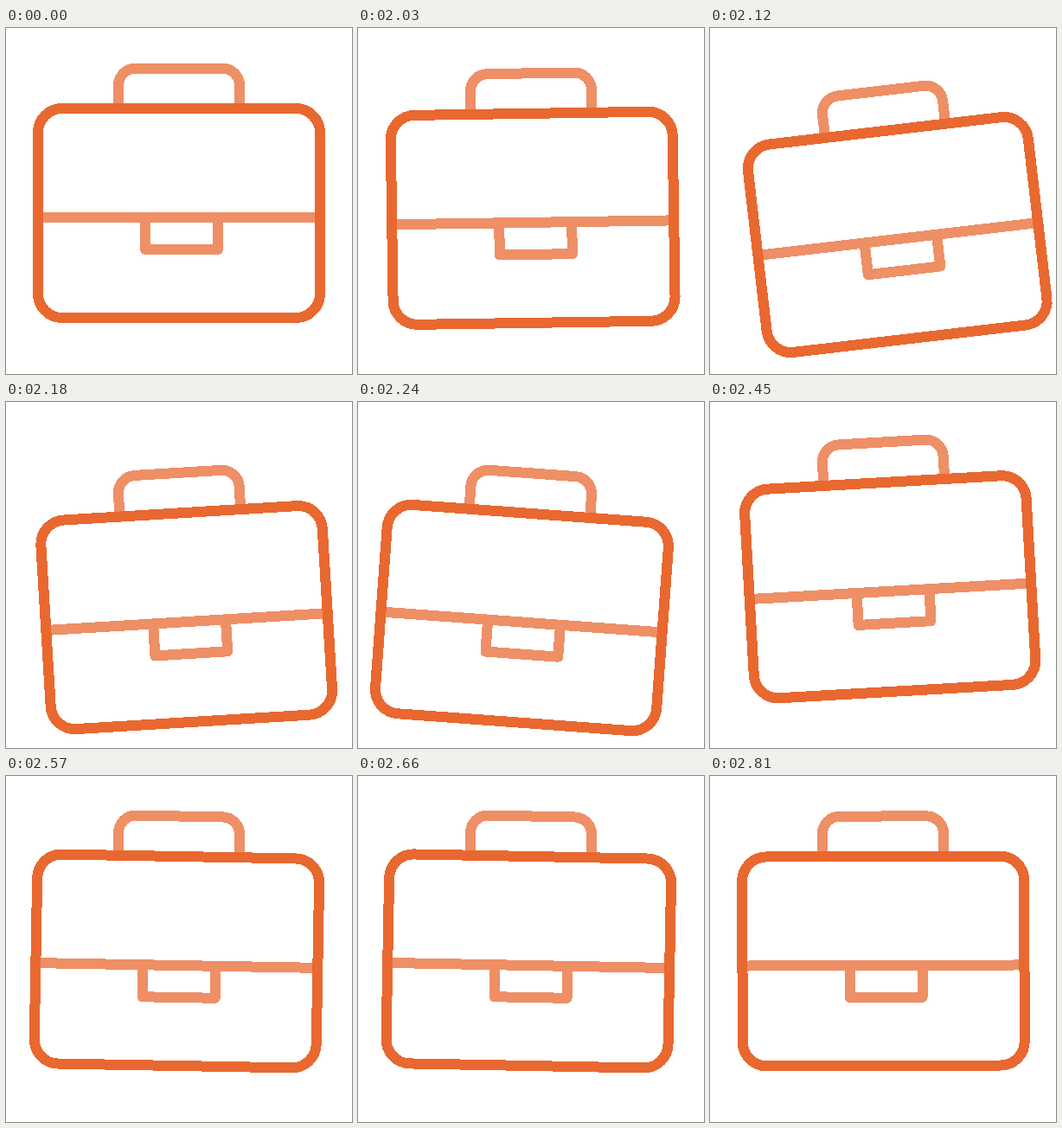
These frames come from a looping animation (400 by 400 pixels, 2.84 s). An HTML page:

```html
<!DOCTYPE html>
<html lang="en">
<head>
<meta charset="utf-8">
<title>Briefcase</title>
<style>
  html, body { margin: 0; width: 100%; height: 100%; overflow: hidden; background: #fff; }
  svg { display: block; width: 100vw; height: 100vh; }
  path, rect { fill: none; stroke-width: 12; shape-rendering: crispEdges; }
  .light { stroke: #ee8f66; stroke-linejoin: round; }
  .dark { stroke: #e86830; }
</style>
</head>
<body>
<svg viewBox="0 0 400 400">
  <g id="case">
    <path class="light" d="M130 93V66.5a20 20 0 0 1 20-20H250a20 20 0 0 1 20 20V93"/>
    <path class="light" d="M40 219H360M161 219V256H245V219"/>
    <rect class="dark" x="37" y="93" width="326" height="242" rx="28"/>
  </g>
</svg>
<script>
  const LOOP = 2840, REST = 2000, STEP = 30;
  const PIVOT = { x: 200, y: 70 };
  const DROP = 37, HALF = 7.1; // depth in px, steps down and steps back up

  // [step, degrees] at each turn of the swing
  const SWING = [[0, 0], [4.3, -6.75], [9.5, 6.8], [15.2, -3.3], [20.5, 2], [24.5, -1], [28, 0]];

  const settle = u => u * (1 - u) ** 2 + 3 * (1 - u) * u * u + u ** 3;

  function angleAt(n) {
    const i = Math.max(1, SWING.findIndex(([at]) => at >= n));
    const [t0, a0] = SWING[i - 1], [t1, a1] = SWING[i];
    const u = (n - t0) / (t1 - t0);
    return a0 + (a1 - a0) * (1 - Math.cos(Math.PI * u)) / 2;
  }

  function dropAt(n) {
    const u = 1 - Math.abs(n - HALF) / HALF;
    return u > 0 ? DROP * settle(u) : 0;
  }

  const briefcase = document.getElementById("case");
  const start = performance.now();

  function draw(now) {
    const t = Math.max(0, now - start) % LOOP;
    const n = Math.max(0, Math.floor((t - REST) / STEP));
    briefcase.setAttribute("transform",
      `translate(0 ${dropAt(n).toFixed(3)}) rotate(${angleAt(n).toFixed(3)} ${PIVOT.x} ${PIVOT.y})`);
    requestAnimationFrame(draw);
  }
  draw(start);
</script>
</body>
</html>
```
